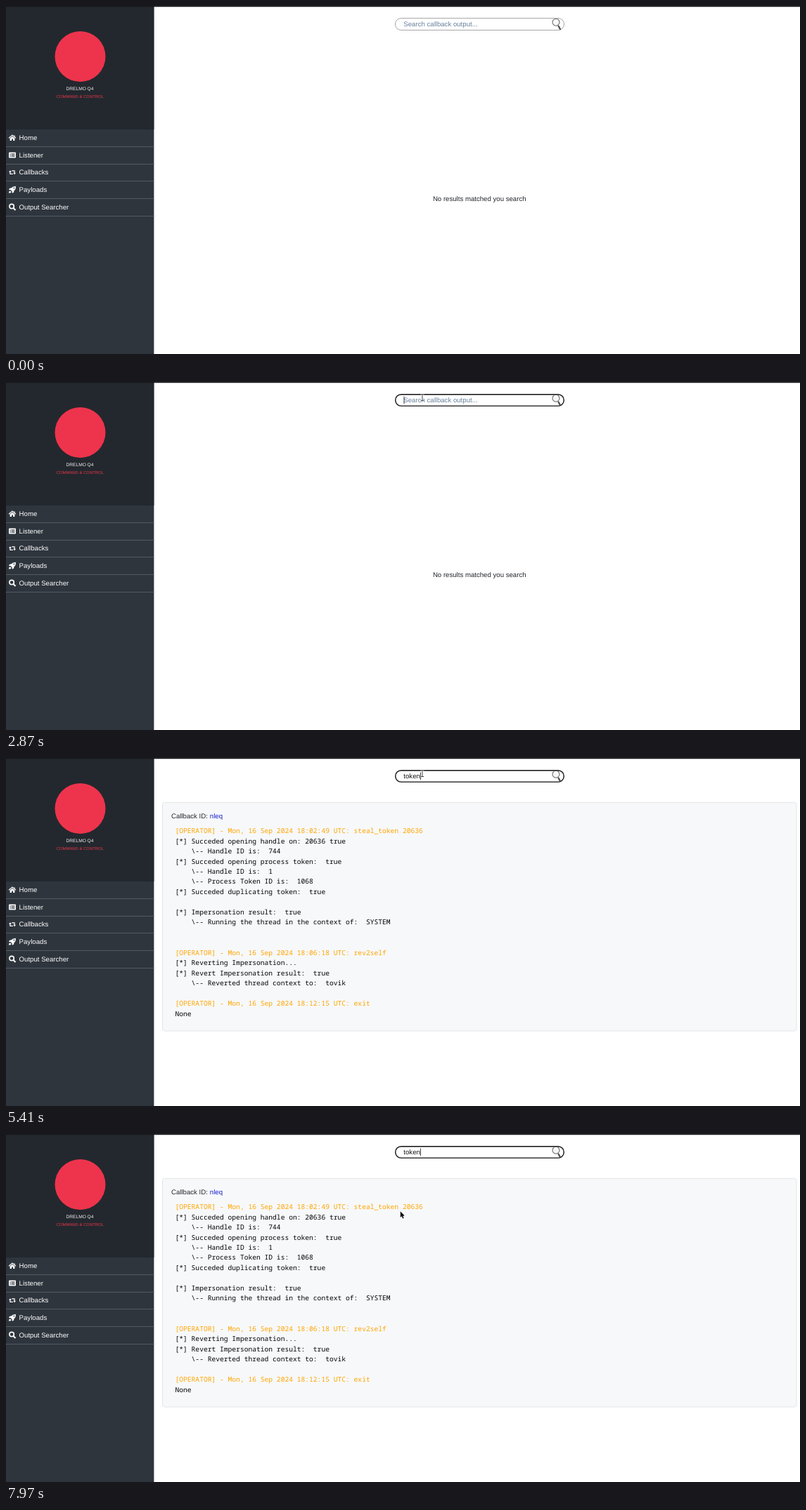
Write an HTML page with a canvas that moves like this. It is 1129 px wide and 496 px high and loops after 8 s.

```html
<!DOCTYPE html>
<html lang="en">
<head>
<meta charset="utf-8">
<title>Output searcher</title>
<style>
  html, body { margin: 0; width: 100%; height: 100%; overflow: hidden; background: #fff; }
  canvas { display: block; }
</style>
</head>
<body>
<canvas id="stage" width="1129" height="496"></canvas>
<script>
const ctx = document.getElementById('stage').getContext('2d');
const LOOP = 8000;
const SIZE = 9.65;
const SANS = SIZE + 'px "Liberation Sans", Arial, sans-serif';
const MONO = SIZE + 'px "Noto Sans Mono", monospace';
const LINE = 14.47;
const SIDE = 210.4;
const MENU = ['Home', 'Listener', 'Callbacks', 'Payloads', 'Output Searcher'];

// Lines starting with "[OP" are drawn in orange.
const TOKEN_LOG = `[OPERATOR] - Mon, 16 Sep 2024 18:02:49 UTC: steal_token 20636
[*] Succeded opening handle on: 20636 true
    \\-- Handle ID is:  744
[*] Succeded opening process token:  true
    \\-- Handle ID is:  1
    \\-- Process Token ID is:  1068
[*] Succeded duplicating token:  true

[*] Impersonation result:  true
    \\-- Running the thread in the context of:  SYSTEM


[OPERATOR] - Mon, 16 Sep 2024 18:06:18 UTC: rev2self
[*] Reverting Impersonation...
[*] Revert Impersonation result:  true
    \\-- Reverted thread context to:  tovik

[OPERATOR] - Mon, 16 Sep 2024 18:12:15 UTC: exit
None`.split('\n');

const OTHER_LOG = `[OPERATOR] - Mon, 16 Sep 2024 18:20:31 UTC: pwd
Current directory listed

[OPERATOR] - Mon, 16 Sep 2024 18:21:07 UTC: exit
None`.split('\n');

// [time, text] and [from, to] schedules in ms
const TYPING = [[0, ''], [2920, 't'], [3390, 'to'], [3680, 'tok'], [3840, 'toke'], [4250, 'token']];
const CARET = [[1700, 2300], [2870, 4830], [5410, 5990], [6570, 7290], [7970, 8000]];
// [time, x, y] of the pointer hot spot
const PATH = [
  [100, 665, 475], [220, 650, 340], [340, 626, 180], [460, 608, 88], [580, 598, 48], [700, 595, 31],
  [860, 595, 31], [920, 596, 35], [980, 593, 27], [1040, 595, 31],
  [1240, 595, 31], [1260, 592, 22], [6410, 592, 22], [6500, 586, 45], [6600, 574, 83],
  [6710, 566.3, 101], [6910, 563.5, 106], [7530, 563.5, 106], [7680, 560.8, 110.3]
];

function rect(x, y, w, h, color) {
  ctx.fillStyle = color;
  ctx.fillRect(x, y, w, h);
}

function disc(x, y, r, color) {
  ctx.fillStyle = color;
  ctx.beginPath();
  ctx.arc(x, y, r, 0, Math.PI * 2);
  ctx.fill();
}

function text(s, x, y, color, font = SANS, align = 'left') {
  ctx.font = font;
  ctx.textAlign = align;
  ctx.fillStyle = color;
  ctx.fillText(s, x, y);
}

function poly(points, color, close = true) {
  ctx.beginPath();
  points.forEach(([x, y]) => ctx.lineTo(x, y));
  if (close) {
    ctx.closePath();
    ctx.fillStyle = color;
    ctx.fill();
  } else {
    ctx.strokeStyle = color;
    ctx.stroke();
  }
}

function roundBox(x, y, w, h, r, fill, stroke, width) {
  ctx.beginPath();
  ctx.roundRect(x, y, w, h, r);
  ctx.fillStyle = fill;
  ctx.fill();
  if (!stroke) return;
  ctx.strokeStyle = stroke;
  ctx.lineWidth = width;
  ctx.stroke();
}

// Each icon sits in a 10 by 10 box.
const ICONS = [
  () => {
    ctx.lineWidth = 1.2;
    poly([[0, 5.4], [5, 1.2], [10, 5.4]], '#fff', false);
    poly([[1.6, 5.7], [5, 2.9], [8.4, 5.7], [8.4, 9.2], [6, 9.2], [6, 6.7], [4, 6.7], [4, 9.2], [1.6, 9.2]], '#fff');
    rect(7.4, 1.5, 1.1, 2.4, '#fff');
  },
  () => {
    roundBox(0, 1, 10, 8, 1, '#fff');
    for (let i = 0; i < 3; i++) {
      rect(1.5, 2.8 + i * 1.8, 1.1, 1.1, '#2e353d');
      rect(3.5, 2.8 + i * 1.8, 5, 1, '#2e353d');
    }
  },
  () => {
    ctx.lineWidth = 1.2;
    poly([[1.9, 3.2], [1.9, 7.3], [5.8, 7.3]], '#fff', false);
    poly([[4.2, 2.8], [8.1, 2.8], [8.1, 7]], '#fff', false);
    poly([[0, 4.5], [1.9, 2.1], [3.8, 4.5]], '#fff');
    poly([[6.2, 5.7], [10, 5.7], [8.1, 8.1]], '#fff');
  },
  () => {
    ctx.fillStyle = '#fff';
    ctx.beginPath();
    ctx.moveTo(9.8, 0.2);
    ctx.quadraticCurveTo(10.4, 4.4, 7.3, 6.6);
    ctx.lineTo(7, 9);
    ctx.lineTo(4.8, 10);
    ctx.lineTo(4.5, 7.3);
    ctx.lineTo(2.7, 5.5);
    ctx.lineTo(0, 5.2);
    ctx.lineTo(1.1, 3);
    ctx.lineTo(3.4, 2.7);
    ctx.quadraticCurveTo(5.6, -0.4, 9.8, 0.2);
    ctx.fill();
    poly([[0, 10], [0.5, 7.3], [2, 6.6], [3.4, 8], [2.7, 9.5]], '#fff');
    disc(7.4, 2.6, 0.9, '#2e353d');
  },
  () => {
    ctx.strokeStyle = '#fff';
    ctx.lineWidth = 1.6;
    ctx.beginPath();
    ctx.arc(4.1, 4.1, 3.2, 0, Math.PI * 2);
    ctx.stroke();
    ctx.lineWidth = 2;
    poly([[6.5, 6.5], [9.5, 9.5]], '#fff', false);
  }
];

function drawSidebar() {
  rect(0, 0, SIDE, 496, '#2e353d');
  rect(0, 0, SIDE, 176, '#23282e');
  disc(105.5, 72, 36, '#ee344c');
  text('DRELMO Q4', 105, 120, '#f4f4f4', '6.6px "Liberation Sans", sans-serif', 'center');
  text('COMMAND & CONTROL', 105.3, 130.6, '#ee344c', '5.9px "Liberation Sans", sans-serif', 'center');
  MENU.forEach((label, i) => {
    const y = 187.7 + i * 24.67;
    text(label, 18.6, y + 3.2, '#fff');
    rect(0, Math.round(y + 12.3), SIDE, 1, '#555b62');
    ctx.save();
    ctx.translate(4, y - 4.9);
    ICONS[i]();
    ctx.restore();
  });
}

function drawLens() {
  ctx.lineCap = 'round';
  ctx.lineWidth = 2.2;
  poly([[785.6, 28.6], [788, 33]], '#4b4b4b', false);
  ctx.lineCap = 'butt';
  ctx.lineWidth = 1.1;
  ctx.strokeStyle = '#6a6a6a';
  ctx.fillStyle = '#f7f7f7';
  ctx.beginPath();
  ctx.arc(782, 23.2, 5, 0, Math.PI * 2);
  ctx.fill();
  ctx.stroke();
}

function drawSearch(t, typed) {
  const focused = t >= 1700;
  const w = focused ? 1.4 : 0.8;
  roundBox(553 + w / 2, 17 + w / 2, 241 - w, 17.8 - w, 8.9, '#fff', focused ? '#101010' : '#8f8f8f', w);
  if (typed) text(typed, 565.3, 29.2, '#16181b');
  else text('Search callback output...', 565.3, 29.2, '#66809c');
  if (CARET.some(([from, to]) => t >= from && t < to)) {
    ctx.font = SANS;
    rect(565.6 + ctx.measureText(typed).width, 20.5, 0.8, 10.5, '#111');
  }
  drawLens();
}

function drawCard(y, w, h, id, lines) {
  roundBox(222.5, y + 0.5, w, h, 3, '#f7f8fa', '#dde0e3', 0.8);
  text('Callback ID: ', 235, y + 23.2, '#24282d');
  text(id, 289.8, y + 23.2, '#1a22cc');
  lines.forEach((line, i) => {
    text(line, 240.5, y + 44.1 + i * LINE, line.startsWith('[OP') ? '#ffa500' : '#050505', MONO);
  });
}

function drawResults(t) {
  if (t < 2920) {
    text('No results matched you search', 606.9, 278.3, '#212529');
    return;
  }
  const long = t < 3680;
  const w = long ? 892.5 : 901.5;
  drawCard(63, w, 325.5, 'nleq', TOKEN_LOG);
  if (long) {
    drawCard(400, w, 130, 'wtua', OTHER_LOG);
    rect(1120, 1, 9, 495, '#f5f5f5');
    rect(1121, 10, 7, 150, '#c1c1c1');
  }
}

function pointerAt(t) {
  const i = PATH.findIndex(p => p[0] > t);
  if (i < 0) return PATH[PATH.length - 1].slice(1);
  const [t0, x0, y0] = PATH[i - 1];
  const [t1, x1, y1] = PATH[i];
  const k = (t - t0) / (t1 - t0);
  return [x0 + (x1 - x0) * k, y0 + (y1 - y0) * k];
}

function drawBeam(x, y) {
  const strokes = [['#fff', 2], ['#333', 0.9]];
  for (const [color, width] of strokes) {
    ctx.lineWidth = width;
    poly([[x, y - 4.3], [x, y + 4.3]], color, false);
    poly([[x - 2.2, y - 4.5], [x + 2.2, y - 4.5]], color, false);
    poly([[x - 2.2, y + 4.5], [x + 2.2, y + 4.5]], color, false);
  }
}

function drawArrow(x, y) {
  const shape = [[0, 0], [0, 8.8], [1.9, 7], [3.4, 10.3], [4.9, 9.6], [3.5, 6.5], [6, 6.3]]
    .map(([dx, dy]) => [x + dx, y + dy]);
  ctx.lineWidth = 1.2;
  poly([...shape, shape[0]], '#fff', false);
  poly(shape, '#0a0a0a');
}

function drawPointer(t) {
  if (t < 100) return;
  const [x, y] = pointerAt(t);
  const overInput = y > 17 && y < 36;
  const overText = t > 6410 && y > 97 && y < 109;
  (overInput || overText ? drawBeam : drawArrow)(x, y);
}

function draw(now) {
  const t = now % LOOP;
  const typed = TYPING.filter(([at]) => at <= t).pop()[1];
  ctx.textRendering = 'geometricPrecision';
  rect(0, 0, 1129, 496, '#fff');
  drawSidebar();
  drawResults(t);
  // The scrollbar narrows the page and moves the centred search box.
  ctx.save();
  if (t >= 2920 && t < 3680) ctx.translate(-4.5, 0);
  drawSearch(t, typed);
  ctx.restore();
  rect(0, 0, 1129, 1.2, '#15181c');
  drawPointer(t);
}

const start = performance.now();
function tick() {
  draw(performance.now() - start);
  requestAnimationFrame(tick);
}
tick();
</script>
</body>
</html>
```
